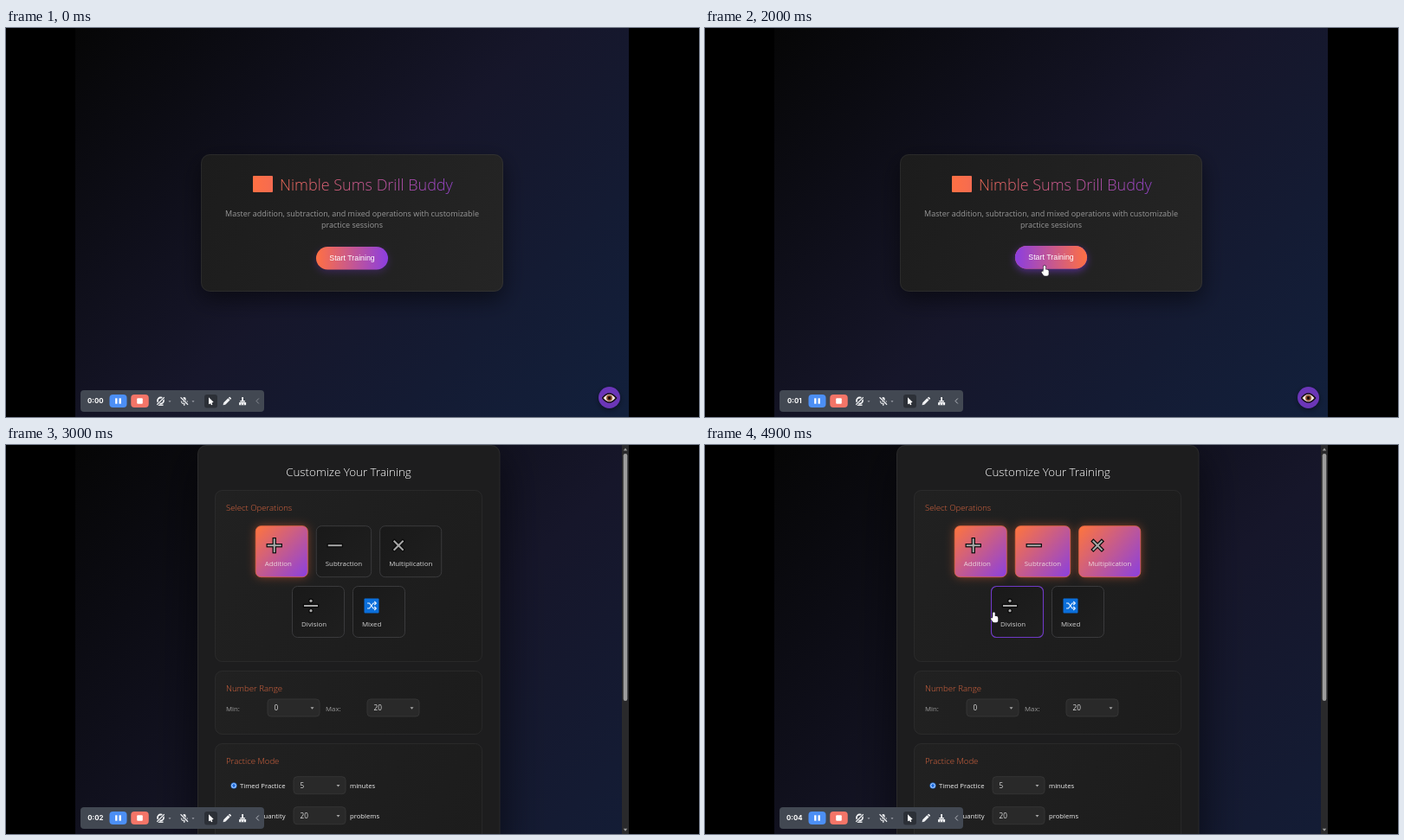
Animation, 800 px wide and 450 px high, one loop 5 s. Source, as an HTML page with a canvas:

```html
<!DOCTYPE html>
<html lang="en">
<head>
<meta charset="utf-8">
<title>Training screens</title>
<style>
html, body { margin: 0; width: 100%; height: 100%; overflow: hidden; background: #000; }
canvas { display: block; width: 800px; height: 450px; }
</style>
</head>
<body>
<canvas id="stage" width="800" height="450"></canvas>
<script>
const ctx = document.getElementById('stage').getContext('2d');
const LOOP = 5000, SWITCH = 2450;
const SANS = '"Open Sans", "Noto Sans", sans-serif';
const ARIAL = '"Liberation Sans", Arial, sans-serif';
const ORANGE = '#ff7043', PURPLE = '#8b3ee0', ICON = '#f4f5f7', BAR = '#424852';
const TAU = Math.PI * 2;
const clamp = v => Math.max(0, Math.min(1, v));
const smooth = v => v * v * (3 - 2 * v);

// Drawing helpers

function layer(draw, x = 0, y = 0, angle = 0, alpha = 1) {
  ctx.save();
  ctx.translate(x, y);
  ctx.rotate(angle);
  ctx.globalAlpha *= alpha;
  draw();
  ctx.restore();
}

function box(x, y, w, h, r, fill, stroke, lineWidth = 1) {
  ctx.beginPath();
  ctx.roundRect(x, y, w, h, r);
  if (fill) { ctx.fillStyle = fill; ctx.fill(); }
  if (stroke) { ctx.strokeStyle = stroke; ctx.lineWidth = lineWidth; ctx.stroke(); }
}

// Bar centred on the current origin
const bar = (w, h, fill, r = 0) => box(-w / 2, -h / 2, w, h, r, fill);

function disc(x, y, r, fill) {
  ctx.beginPath();
  ctx.arc(x, y, r, 0, TAU);
  ctx.fillStyle = fill;
  ctx.fill();
}

function line(color, width, ...points) {
  ctx.strokeStyle = color;
  ctx.lineWidth = width;
  ctx.beginPath();
  points.forEach(p => ctx.lineTo(...p));
  ctx.stroke();
}

function triangle(x, y, w, h, fill) {
  ctx.beginPath();
  ctx.moveTo(x - w / 2, y);
  ctx.lineTo(x + w / 2, y);
  ctx.lineTo(x, y + h);
  ctx.fillStyle = fill;
  ctx.fill();
}

function text(str, x, y, size, color, weight = 400, align = 'left', family = SANS) {
  ctx.font = `${weight} ${size}px ${family}`;
  ctx.textAlign = align;
  ctx.fillStyle = color;
  ctx.fillText(str, x, y);
}

function gradient(x0, y0, x1, y1, ...colors) {
  const g = ctx.createLinearGradient(x0, y0, x1, y1);
  colors.forEach((c, i) => g.addColorStop(i / (colors.length - 1), c));
  return g;
}

function glow(color, blur, dy = 0) {
  ctx.shadowColor = color;
  ctx.shadowBlur = blur;
  ctx.shadowOffsetY = dy;
}

// Layout

const startButton = { x: 358, y: 253, w: 83, h: 26.5 };
const LABEL_SIZE = 7.9;

// Cards are as wide as their label needs, in rows centred on the page
function cardRow(y, labels) {
  const gap = 10, pad = 10.5;
  ctx.font = `${LABEL_SIZE}px ${SANS}`;
  const widths = labels.map(s => Math.max(60, ctx.measureText(s).width + 2 * pad));
  let x = 395.5 - (widths.reduce((a, b) => a + b + gap, -gap)) / 2;
  return labels.map((label, i) => {
    const card = { label, x, y, w: widths[i], h: 59, chosenAt: Infinity };
    x += widths[i] + gap;
    return card;
  });
}

const cards = [
  ...cardRow(93.7, ['Addition', 'Subtraction', 'Multiplication']),
  ...cardRow(163.5, ['Division', 'Mixed'])
];
const [addition, subtraction, multiplication, division] = cards;
addition.chosenAt = 0;
subtraction.chosenAt = 4100;
multiplication.chosenAt = 4480;

// Pointer

const inside = (r, dx, dy) => ({ x: r.x + dx, y: r.y + dy });
const trips = [
  { start: 900, end: 1950, to: inside(startButton, 34, 22.5) },
  { start: 2400, end: 2580, to: { x: 399, y: 276.5 } },
  { start: 3300, end: 3850, to: inside(subtraction, 30.5, 40) },
  { start: 4130, end: 4380, to: inside(multiplication, 29, 37) },
  { start: 4540, end: 4860, to: inside(division, 3, 30.5) }
];

function pointerAt(t) {
  const resting = t > 2700 && t < 3300;
  if (t < trips[0].start || resting) return null;
  let x = 710.5, y = 157.5;
  for (const { start, end, to } of trips) {
    const u = clamp((t - start) / (end - start));
    x += (to.x - x) * Math.sin(u * Math.PI / 2);
    y += (to.y - y) * smooth(u);
  }
  return { x, y };
}

function hits(r, t) {
  const p = pointerAt(t);
  return !!p && p.x >= r.x && p.x <= r.x + r.w && p.y >= r.y && p.y <= r.y + r.h;
}

// Share of the last 200 ms spent over the box: acts as a hover transition
function hover(r, t) {
  let n = 0;
  for (let i = 0; i < 10; i++) n += hits(r, t - i * 20);
  return n / 10;
}

function arrow(x, y, outline) {
  layer(() => {
    ctx.beginPath();
    ctx.moveTo(0, 0);
    ctx.lineTo(0, 8);
    ctx.lineTo(5.6, 5.6);
    ctx.closePath();
    if (outline) { ctx.strokeStyle = '#111'; ctx.lineWidth = 1.2; ctx.stroke(); }
    ctx.fillStyle = '#fff';
    ctx.fill();
    line('#fff', 1.5, [2, 5], [3.7, 8.8]);
  }, x, y);
}

function hand(x, y) {
  layer(() => {
    const shape = (grow, fill) => {
      box(-1.2 - grow, -0.4 - grow, 2.4 + 2 * grow, 8 + 2 * grow, 1.2, fill);
      box(-1.6 - grow, 4 - grow, 6.3 + 2 * grow, 7.2 + 2 * grow, 2, fill);
      layer(() => bar(2 + 2 * grow, 4.5 + 2 * grow, fill, 1), -1.8, 8, -0.6);
    };
    shape(0.5, '#23232a');
    shape(0, '#fff');
  }, x, y);
}

// Screens

function backdrop(w, h) {
  // 135 degree gradient line across a w by h page
  const d = (w + h) / 4, cx = 80 + w / 2, cy = h / 2;
  ctx.fillStyle = gradient(cx - d, cy - d, cx + d, cy + d, '#060606', '#16162a', '#12203c');
  ctx.fillRect(80, 0, w, 450);
}

function eyeButton(x, y) {
  layer(() => {
    glow('rgba(0,0,0,.4)', 6, 2);
    disc(x, y, 12.5, '#6b36b8');
  });
  ctx.beginPath();
  ctx.moveTo(x - 8, y + 0.5);
  ctx.quadraticCurveTo(x, y - 9.5, x + 8, y + 0.5);
  ctx.quadraticCurveTo(x, y + 10.5, x - 8, y + 0.5);
  ctx.fillStyle = '#f4e6dc';
  ctx.fill();
  ctx.strokeStyle = '#160d12';
  ctx.lineWidth = 1.6;
  ctx.stroke();
  disc(x, y + 0.5, 3.4, '#8a4a2c');
  disc(x, y + 0.5, 1.7, '#100808');
}

function welcome(t) {
  backdrop(639, 450);
  layer(() => {
    glow('rgba(0,0,0,.5)', 26, 9);
    box(225, 146, 349, 159, 10, gradient(225, 146, 574, 305, '#1c1c1c', '#252525'));
  });
  box(225.5, 146.5, 348, 158, 10, null, 'rgba(255,255,255,.06)');

  const title = gradient(285, 0, 545, 0, ORANGE, PURPLE);
  box(285, 171, 23, 19, 1, title);
  text('Nimble Sums Drill Buddy', 316, 187.5, 18, title, 300);
  text('Master addition, subtraction, and mixed operations with customizable', 399.5, 218, 9, '#989898', 400, 'center');
  text('practice sessions', 399.5, 231, 9, '#989898', 400, 'center');

  const { x, y, w, h } = startButton, k = hover(startButton, t);
  const pill = (...colors) => box(x, y, w, h, h / 2, gradient(x, y, x + w, y, ...colors));
  layer(() => {
    layer(() => {
      glow(`rgba(131,56,236,${0.25 + 0.25 * k})`, 8, 3);
      pill(ORANGE, PURPLE);
    });
    layer(() => pill(PURPLE, ORANGE), 0, 0, 0, k);
    text('Start Training', x + w / 2, 269, 8.8, '#fff', 500, 'center', ARIAL);
  }, 0, -k);
  eyeButton(696.5, 427.5);
}

const barAngles = {
  Addition: [0, TAU / 4], Subtraction: [0], Multiplication: [TAU / 8, -TAU / 8], Division: [0]
};

function cardIcon(label, x, y) {
  layer(() => {
    if (label === 'Mixed') {
      bar(17, 17, '#0b6fdb', 1);
      for (const s of [-1, 1]) {
        line('#e8f2ff', 1.2, [-5, -3 * s], [-2.5, -3 * s], [2, 3 * s], [5, 3 * s]);
        line('#e8f2ff', 1.2, [3.3, 3 * s - 2], [5.3, 3 * s], [3.3, 3 * s + 2]);
      }
      return;
    }
    const size = label === 'Multiplication' ? 15.5 : 16;
    // Dark outline first, grey strokes on top
    for (const [grow, fill] of [[1.2, '#0a0a0a'], [0, '#a8a8a8']]) {
      for (const a of barAngles[label])
        layer(() => bar(size + 2 * grow, 2 + 2 * grow, fill), 0, 0, a);
      if (label === 'Division')
        for (const s of [-1, 1]) disc(0, s * 5.7, 1.6 + grow, fill);
    }
  }, x, y);
}

function drawCard(c, t) {
  const { x, y, w, h } = c;
  const chosen = clamp((t - c.chosenAt) / 180);
  box(x, y, w, h, 6, gradient(x, y, x + w, y + h, '#191919', '#1f1f1f'), '#3a3a3c');
  layer(() => box(x, y, w, h, 6, null, '#6f39c6', 1.1), 0, 0, 0, hover(c, t));
  if (chosen) layer(() => {
    glow('rgba(255,107,53,.45)', 11);
    box(x, y, w, h, 6, gradient(x, y, x + w, y + h, '#ff753c', '#8a40e0'));
    glow('transparent', 0);
    box(x, y, w, h, 6, null, 'rgba(240,100,60,.65)');
  }, 0, 0, 0, chosen);
  cardIcon(c.label, x + 21.5, y + 22.5);
  text(c.label, x + 10.5, y + 46, LABEL_SIZE, chosen > 0.5 ? '#ecd6dc' : '#d2d2d2');
}

function select(x, y, value) {
  box(x, y, 60, 20, 4, '#292929', '#343434');
  text(value, x + 7.5, y + 13, 8.2, '#dcdcdc');
  triangle(x + 51.5, y + 9.3, 4, 2.5, '#a8a8a8');
}

function panel(y, h, heading) {
  box(241.5, y + 0.5, 308, h, 8, gradient(241, y, 549, y + h, '#212121', '#1c1c1c'), 'rgba(255,255,255,.05)');
  text(heading, 254, y + 23.5, 9.6, '#e06840', 300);
}

function settings(t) {
  backdrop(632, 690);
  layer(() => {
    glow('rgba(0,0,0,.6)', 50, 12);
    box(221, 0, 349.5, 480, 10, '#1d1d1e');
  });
  box(221.5, 0.5, 348.5, 480, 10, null, 'rgba(255,255,255,.06)');

  const k = 1 - Math.pow(1 - clamp((t - SWITCH) / 500), 2.4);
  layer(() => {
    text('Customize Your Training', 395.5, 35.8, 13.4, '#fff', 300, 'center');

    panel(52, 198, 'Select Operations');
    cards.forEach(c => drawCard(c, t));

    panel(261, 73, 'Number Range');
    [['Min:', '0'], ['Max:', '20']].forEach(([label, value], i) => {
      const x = 254 + 115 * i;
      text(label, x, 308, 7.8, '#9a9a9a');
      select(x + 48, 294, value);
    });

    panel(345, 130, 'Practice Mode');
    disc(263, 394, 3.5, '#2f7fe8');
    disc(263, 394, 2.6, '#e8f0ff');
    disc(263, 394, 1.9, '#1668e0');
    [['Timed Practice', '5', 'minutes'], ['Question Quantity', '20', 'problems']].forEach(([label, value, unit], i) => {
      const y = 397 + 35 * i;
      text(label, 322.5, y, 7.7, '#f0f0f0', 400, 'right');
      select(332, y - 13.3, value);
      text(unit, 397, y, 7.7, '#f0f0f0');
    });
  }, 0, 10 * (1 - k), 0, k);

  ctx.fillStyle = '#29292b';
  ctx.fillRect(711, 0, 8, 450);
  box(712.7, 10, 4.6, 286, 2.3, '#9c9c9c');
  triangle(715, 6.5, 4.4, -3, '#9c9c9c');
  triangle(715, 443.8, 4.4, 3, '#9c9c9c');
}

// Recorder toolbar

function slash() {
  layer(() => {
    bar(12, 2.6, BAR);
    bar(12, 1.1, ICON);
  }, 0, 0, -TAU / 8);
}

function toolbar(t) {
  box(86, 419, 212, 25, 4, BAR);
  const seconds = Math.max(0, Math.floor((t - 100) / 1000));
  text(`0:0${seconds}`, 103.3, 434.3, 7.8, '#fff', 700, 'center', 'Inter, "Open Sans", sans-serif');

  layer(() => {
    bar(20, 15, '#4c8ff5', 4);
    for (const s of [-1, 1]) layer(() => bar(2.3, 6.4, '#fff'), s * 2.2);
  }, 129.5, 431.5);
  layer(() => {
    bar(20.5, 15, '#f47568', 4);
    bar(6.6, 6.6, '#fff', 1);
  }, 154.5, 431.5);

  // camera off
  layer(() => {
    disc(0, -0.5, 4.4, ICON);
    disc(0, -0.5, 2.6, BAR);
    box(-3, 4, 6, 1.4, 0, ICON);
    slash();
  }, 178.5, 431.5);

  // microphone off
  layer(() => {
    ctx.scale(-1, 1);
    box(-1.8, -4.5, 3.6, 6.5, 1.8, ICON);
    box(-0.5, 3, 1, 2.5, 0, ICON);
    ctx.beginPath();
    ctx.arc(0, 0, 3.5, 0, Math.PI);
    ctx.strokeStyle = ICON;
    ctx.lineWidth = 1;
    ctx.stroke();
    slash();
  }, 205.8, 431.5);
  for (const x of [189, 216]) triangle(x, 431.3, 3, 1.7, '#a2a7af');

  box(229, 424, 15, 15.5, 3, '#2c3037');
  arrow(234, 427.2);

  // pencil
  layer(() => {
    box(-4, -1.5, 7.5, 3, 0, ICON);
    box(4.2, -1.5, 1.8, 3, 0.6, ICON);
    layer(() => triangle(0, 0, 3, 2.2, ICON), -4, 0, TAU / 4);
  }, 255, 431.8, -TAU / 8);

  // brush
  layer(() => {
    box(-0.9, -4.5, 1.8, 4, 0, ICON);
    box(-2.8, -0.5, 5.6, 1.5, 0, ICON);
    box(-4, 1.6, 8, 3.2, 0.5, ICON);
    for (const s of [-1, 1]) box(s * 1.5 - 0.3, 2.8, 0.6, 2, 0, BAR);
  }, 273.1, 431.5);

  ctx.globalAlpha = t < 100 ? 0.6 : 1;
  line('#b4b8bf', 1, [291.8, 428.5], [289, 431.5], [291.8, 434.5]);
  ctx.globalAlpha = 1;
}

function render(t) {
  ctx.fillStyle = '#000';
  ctx.fillRect(0, 0, 800, 450);
  const onWelcome = t < SWITCH;
  layer(() => {
    ctx.beginPath();
    ctx.rect(80, 0, 639, 450);
    ctx.clip();
    (onWelcome ? welcome : settings)(t);
    toolbar(t);
    const p = pointerAt(t);
    if (!p) return;
    const targets = onWelcome ? [startButton] : cards;
    if (targets.some(r => hits(r, t))) hand(p.x, p.y);
    else arrow(p.x, p.y, true);
  });
}

const begun = performance.now();
function tick() {
  render((performance.now() - begun) % LOOP);
  requestAnimationFrame(tick);
}
tick();
</script>
</body>
</html>
```
